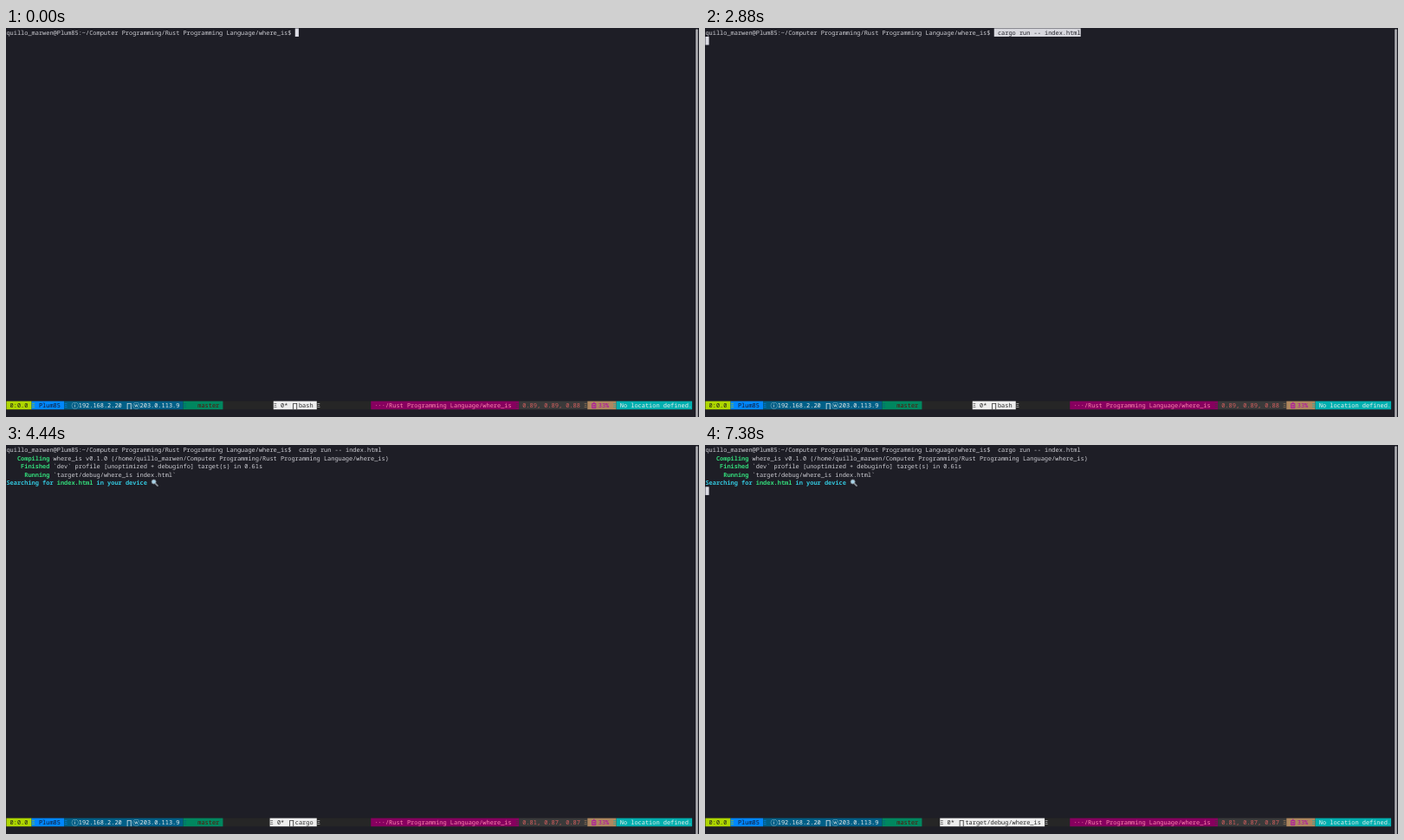
Write an HTML page that moves like this. It is 800 px wide and 450 px high and loops after 8 s.

```html
<!DOCTYPE html>
<html lang="en">
<head>
<meta charset="utf-8">
<title>Terminal</title>
<style>
  html, body { margin: 0; width: 100%; height: 100%; overflow: hidden; background: #1e1e26; }
  #screen {
    position: absolute; width: 1920px; height: 1080px; overflow: hidden;
    transform: scale(calc(5 / 12)); transform-origin: 0 0;
    font: 16.6667px/23px "Noto Sans Mono", "Noto Sans CJK JP", "DejaVu Sans", monospace;
    text-rendering: geometricPrecision; font-variant-ligatures: none;
  }
  #screen > span { position: absolute; height: 23px; white-space: pre; }
  #scrollbar { position: absolute; left: 1911px; top: 3px; width: 6px; height: 1080px; border-radius: 3px; background: #b4b4b8; }
  svg { display: block; }
</style>
</head>
<body>
<div id="screen"><div id="scrollbar"></div></div>
<script>
const LOOP = 8000, CELL_W = 10, CELL_H = 23, PAD = 1, STATUS = 45;
const FG = '#d0d0d6', GREEN = '#33da7a', CYAN = '#33c7de', CURSOR = '#dcdce4';
const DARK = '#262626', LIGHT = '#eeeeee';
const screen_ = document.getElementById('screen');
const items = [];

// Places text on the character grid, visible during [from, to).
function put(row, col, text, color = FG, { bg, bold, cols, html, size, from = 0, to = LOOP } = {}) {
  const el = document.createElement('span');
  if (html) el.innerHTML = html; else el.textContent = text;
  el.style.left = PAD + col * CELL_W + 'px';
  el.style.top = PAD + row * CELL_H + 'px';
  el.style.color = color;
  if (bg) el.style.background = bg;
  if (bold) el.style.fontWeight = 700;
  if (cols) el.style.width = cols * CELL_W + 'px';
  if (size) el.style.fontSize = size + 'px';
  screen_.append(el);
  items.push({ el, from, to });
}

const bar = (col, end, bg, time) => put(STATUS, col, '', FG, { bg, cols: end - col, ...time });
const label = (col, text, color, opts) => put(STATUS, col, text, color, opts);
const cursor = (row, col, from, to, bg = CURSOR) => put(row, col, '', FG, { bg, cols: 1, from, to });

// Shell session
const path = 'Computer Programming/Rust Programming Language/where_is';
const command = ' cargo run -- index.html';
put(0, 0, `quillo_marwen@Plum85:~/${path}$`);
put(0, 80, command, '#1e1e26', { bg: '#d8d8de', from: 1810, to: 3750 });
put(0, 80, command, FG, { from: 3750 });

put(1, 3, 'Compiling', GREEN, { bold: true, from: 3810 });
put(1, 13, `where_is v0.1.0 (/home/quillo_marwen/${path})`, FG, { from: 3810 });
const building = { from: 3880, to: 4310 };
put(2, 4, 'Building', CYAN, { bold: true, ...building });
put(2, 13, `[${'='.repeat(25)}> ] 80/81: where_is(bin)`, FG, building);

put(2, 4, 'Finished', GREEN, { bold: true, from: 4310 });
put(2, 13, '`dev` profile [unoptimized + debuginfo] target(s) in 0.61s', FG, { from: 4310 });
put(3, 5, 'Running', GREEN, { bold: true, from: 4310 });
put(3, 13, '`target/debug/where_is index.html`', FG, { from: 4310 });
const searching = { bold: true, from: 4380 };
put(4, 0, 'Searching for', CYAN, searching);
put(4, 14, 'index.html', GREEN, searching);
put(4, 25, 'in your device', CYAN, searching);
put(4, 40, '', FG, { from: 4380, html: `<svg width="22" height="23">
  <path d="M13 14l6 6" stroke="#8a8f96" stroke-width="4" stroke-linecap="round"/>
  <circle cx="8.5" cy="9" r="6" fill="#a9d3e8" stroke="#7f878f" stroke-width="2"/></svg>` });

// Blinking cursor
cursor(0, 80, 0, 500);
cursor(0, 80, 1060, 1810);
cursor(1, 0, 1810, 2250);
cursor(1, 0, 2880, 3380);
cursor(1, 0, 3750, 3810);
cursor(2, 0, 3810, 3880);
cursor(2, 0, 3880, 4310, CYAN);
cursor(5, 0, 5000, 5560);
cursor(5, 0, 6190, 6750);
cursor(5, 0, 7380, LOOP);

// Status line: [start, end, background]
const segments = [
  [0, 190, DARK], [0, 7, '#afd700'], [7, 16, '#0087ff'], [16, 49, '#005f87'], [49, 60, '#00875f'],
  [101, 142, '#87005f'], [142, 161, '#3a3a3a'], [161, 169, '#af875f'], [169, 190, '#00afaf'],
];
for (const [start, end, bg] of segments) bar(start, end, bg);
const separators = [
  [7, '#afd700'], [16, '#0087ff'], [49, '#005f87'], [141, '#3a3a3a'], [160, '#af875f'], [168, '#00afaf'],
];
for (const [col, color] of separators) label(col, 'Ξ', color);

label(1, '0:0.0', '#1c1c1c');
label(9, 'Plum85', '#171421');
label(18, 'ⓘ', LIGHT, { size: 20 });
label(20, '192.168.2.20', LIGHT);
label(33, '∏', LIGHT, { size: 20 });
label(35, 'ⓦ', LIGHT, { size: 20 });
label(37, '203.0.113.9', LIGHT);
label(53, 'master', '#5f0f08');
label(102, '···/Rust Programming Language/where_is', '#ff87af');
label(143, '0.89, 0.89, 0.88', '#d75f5f', { to: 3440 });
label(143, '0.81, 0.87, 0.87', '#d75f5f', { from: 3440 });
label(162, '', '#af00af', { html: `<svg width="16" height="23" fill="none" stroke="currentColor" stroke-width="2">
  <path d="M3 7h10v12h-10zM6 4h4M5 12h6M5 15h6"/></svg>` });
label(164, '33%', '#af00af');
label(170, 'No location defined.', LIGHT);

// Centred window tab
function tab(start, name, from, to) {
  const time = { from, to }, end = start + 8 + name.length;
  bar(start, end, LIGHT, time);
  label(start, 'Ξ', DARK, time);
  label(start + 2, '0*', DARK, time);
  label(start + 5, '∏', DARK, { size: 20, ...time });
  label(start + 7, name, DARK, time);
  label(end, 'Ξ', LIGHT, time);
}
tab(74, 'bash', 0, 4380);
tab(73, 'cargo', 4380, 5310);
tab(65, 'target/debug/where_is', 5310, LOOP);

const begin = performance.now();
function draw() {
  const t = (performance.now() - begin) % LOOP;
  for (const { el, from, to } of items) el.style.visibility = t >= from && t < to ? 'visible' : 'hidden';
  requestAnimationFrame(draw);
}
draw();
</script>
</body>
</html>
```
